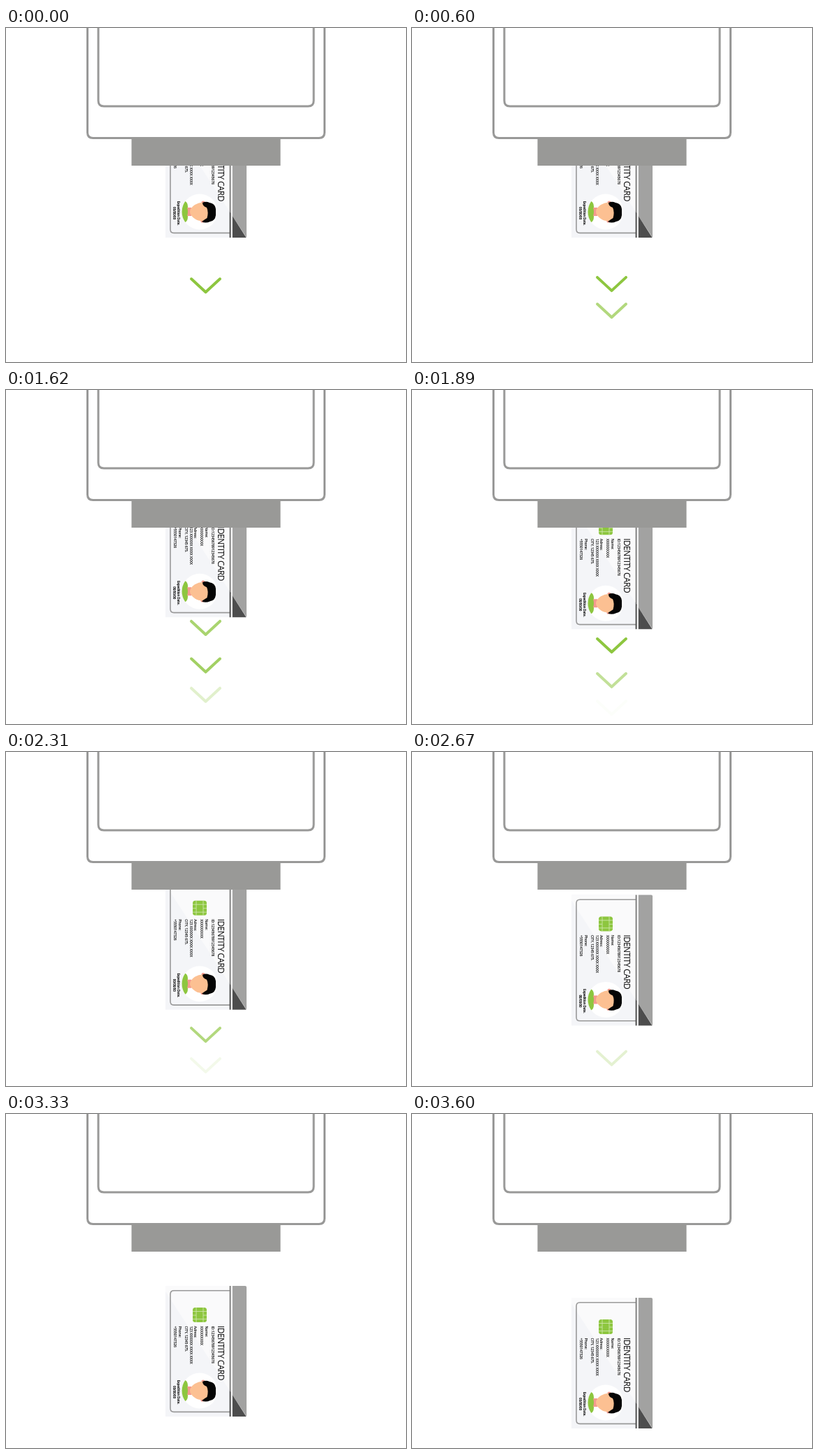
An HTML page for the animation above (4630 ms loop, 572x478 px).

```html
<!DOCTYPE html>
<html lang="en">
<head>
<meta charset="utf-8">
<title>Identity card reader</title>
<style>
  html, body { margin: 0; width: 100%; height: 100%; overflow: hidden; background: #fff; }
  svg { display: block; width: 100vw; height: 100vh; }
  text { font-family: "Open Sans", "Noto Sans", sans-serif; fill: #0a0a0a; white-space: pre; }
  .small { font-size: 5.2px; font-weight: 600; letter-spacing: -.2px; }
  .date { font-size: 4.6px; font-weight: 700; letter-spacing: -.2px; text-anchor: middle; }
</style>
</head>
<body>
<svg viewBox="0 0 572 478">
  <defs>
    <clipPath id="below"><rect y="197" width="572" height="281"/></clipPath>
  </defs>

  <g id="arrows" fill="none" stroke="#8dc63f" stroke-width="4" stroke-linecap="round" stroke-linejoin="round"></g>

  <g clip-path="url(#below)">
    <g id="card">
      <path fill="#f4f5f8" d="M228 263H320V450H228Z"/>
      <path fill="#fafafb" d="M228 263H320V413L228 271Z"/>
      <path fill="none" stroke="#9a9a9a" stroke-width="1.6" d="M320 269.8H240Q235 269.8 235 275V438Q235 443.4 240 443.4H320"/>

      <path fill="#a2a2a1" d="M323.5 263H342Q344 263 344 265V450L323.5 418.5Z"/>
      <path fill="#4d4d4d" d="M323.5 418.5L343.5 450H323.5Z"/>
      <path fill="#fff" d="M321.5 263h2v187h-2z"/>
      <path fill="#808080" d="M319.6 263h2v152l-2-3z"/>
      <path fill="#4d4d4d" d="M319.6 412l2 3v35h-2z"/>

      <rect x="267" y="294" width="20" height="21" rx="3.5" fill="#8dc63f"/>
      <path fill="none" stroke="#d5eab5" stroke-width=".8" d="M272 294V315M282 294V315M267 299.5H287M267 305H272M282 305H287M267 310.5H287"/>

      <circle cx="277" cy="413" r="25.5" fill="#fff"/>
      <path fill="#8dc63f" d="M256.4 398A25.5 25.5 0 0 0 256.4 428Q260 426 260 420V406Q260 400 256.4 398Z"/>
      <path fill="#f39a8e" d="M259 407H265V419H259Q261 413 259 407Z"/>
      <ellipse cx="282" cy="399.6" rx="2.6" ry="2.2" fill="#f39a8e"/>
      <ellipse cx="281" cy="426.4" rx="2.6" ry="2.2" fill="#f39a8e"/>
      <path fill="#fcc092" d="M263 413Q263 408 270 403Q277 399 284 400L291 404V422L284 426Q276 427 270 423Q263 418 263 413Z"/>
      <path fill="#050505" d="M281 400Q286 397.5 291 400Q299 401 300 409V418Q299 426 292 427Q285 430 280 427Q284 424 287.5 422Q290 413 287 407Q281 405 281 400Z"/>
      <g id="labels"></g>
    </g>
  </g>

  <g fill="none" stroke="#999998" stroke-width="3">
    <path d="M116.5 -5V149.5Q116.5 157.5 124.5 157.5H447.5Q455.5 157.5 455.5 149.5V-5"/>
    <path d="M132 -5V104Q132 112 140 112H432Q440 112 440 104V-5"/>
  </g>
  <path fill="#999997" d="M179.5 157H392.5V197H179.5Z"/>
</svg>
<script>
const LOOP = 4630, STEP = 30, END = 3600;
const CARD_START = 1220, CARD_TRAVEL = 150;
const FADE_END = 445, FADE_SPAN = 77, FADE_IN = 120;

// Each arrow: appearance time, top edge at that time, speed in px per ms
const arrows = [
  { start: -200, top: 345, speed: .06 },
  { start: 450, top: 344.6, speed: .0685 },
  { start: 990, top: 333, speed: .0787 },
  { start: 1530, top: 320.6, speed: .093 }
];

// Baseline x, text start y, content
const lines = [
  [294, 320.5, "ID:12345678912345678"],
  [285, 320.5, "Name:"],
  [278, 320.5, "XXXXXXXXX"],
  [269, 320.5, "Adress:"],
  [262.5, 320.5, "123 XXXXXX XXXX XXXX"],
  [255.5, 320.5, "CITY, 12345 675."],
  [247, 320.5, "Phone:"],
  [240, 320.5, "+5550147326"],
  [245, 415, "Expedition Date.", "date"],
  [239, 415, "00/00/00", "date"]
];

const NS = "http://www.w3.org/2000/svg";
const byId = id => document.getElementById(id);

function add(parent, tag, attrs) {
  const el = document.createElementNS(NS, tag);
  for (const key in attrs) el.setAttribute(key, attrs[key]);
  return parent.appendChild(el);
}

function addLabel(x, y, content, attrs) {
  const place = `translate(${x} ${y}) rotate(90)`;
  add(byId("labels"), "text", { transform: place, ...attrs }).textContent = content;
}

addLabel(303.3, 320, "IDENTITY CARD", { "font-size": 12, "letter-spacing": -.6 });
for (const [x, y, content, kind = "small"] of lines) addLabel(x, y, content, { class: kind });

for (const arrow of arrows) {
  arrow.el = add(byId("arrows"), "path", { d: "M265 2L285.5 21L306 2" });
}

const clamp = v => Math.max(0, Math.min(1, v));

function render(time) {
  const t = Math.min(END, Math.floor(time / STEP) * STEP);
  const progress = clamp((t - CARD_START) / (END - CARD_START));
  byId("card").setAttribute("transform", `translate(0 ${CARD_TRAVEL * (progress - 1)})`);

  for (const { el, start, top, speed } of arrows) {
    const age = t - start;
    const y = top + speed * age;
    const opacity = Math.min(clamp(age / FADE_IN), clamp((FADE_END - y) / FADE_SPAN));
    el.setAttribute("transform", `translate(0 ${y})`);
    el.setAttribute("opacity", opacity);
  }
}

const origin = performance.now();
function tick() {
  render((performance.now() - origin) % LOOP);
  requestAnimationFrame(tick);
}
tick();
</script>
</body>
</html>
```
